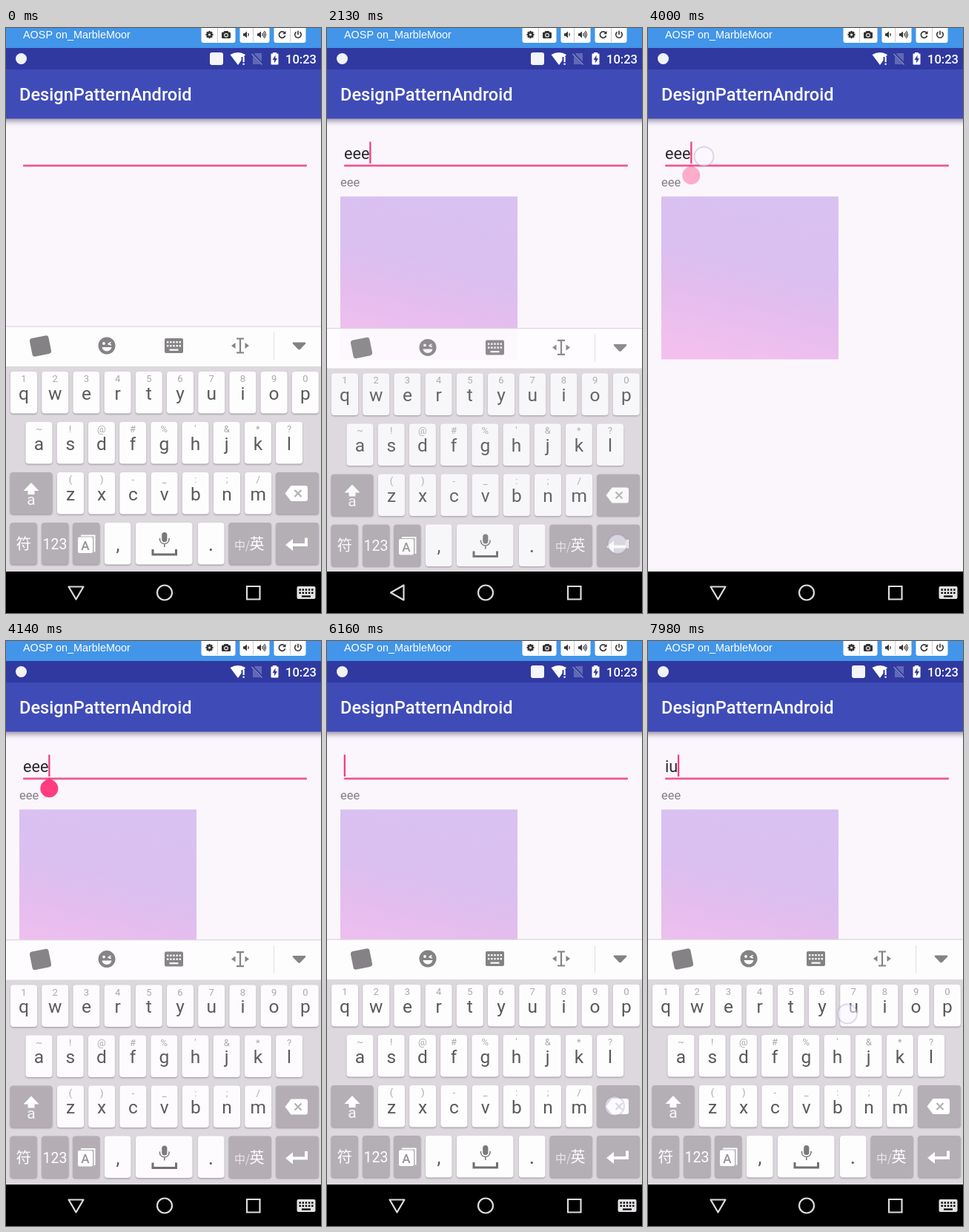
An HTML page with a canvas for the animation above (8000 ms loop, 425 px wide and 790 px high).

```html
<!DOCTYPE html>
<html lang="en">
<head>
<meta charset="utf-8">
<title>Text field demo</title>
<style>
  html, body { margin: 0; width: 100%; height: 100%; overflow: hidden; background: #fbf6fc; }
  canvas { display: block; width: 425px; height: 790px; }
</style>
</head>
<body>
<canvas id="stage"></canvas>
<script>
const W = 425, H = 790, LOOP = 8000;
const canvas = document.getElementById('stage');
const ratio = window.devicePixelRatio || 1;
canvas.width = W * ratio;
canvas.height = H * ratio;
const c = canvas.getContext('2d');

const ROBOTO = 'Roboto, sans-serif';
const ARIAL = '"Liberation Sans", Arial, sans-serif';
const CJK = '"Noto Sans CJK SC", "Noto Sans CJK", sans-serif';
const PINK = '#ff3d7f', PAPER = '#fbf6fc', KEY_GRAY = '#b4afb4', ICON = '#858285';
const PITCH = 42.2, KEY_W = 36, KEY_H = 56.5;

// Touches: start, end, position and the key they press.
const taps = [
  [420, 590, 105, 505, 'e'], [660, 840, 105, 505, 'e'], [900, 1210, 105, 505, 'e'],
  [1980, 2140, 392, 697, 'enter'], [3830, 4080, 75.5, 173.5, ''],
  [5750, 5870, 388, 628, 'del'], [5930, 6040, 388, 628, 'del'],
  [6080, 6230, 388, 628, 'del'], [6300, 6430, 388, 628, 'del'],
  [7220, 7500, 320, 504, 'i'], [7800, 8000, 269, 503.5, 'u']
].map(([start, end, x, y, key]) => ({ start, end, x, y, key }));

const edits = [[0, ''], [510, 'e'], [760, 'ee'], [1010, 'eee'],
  [5800, 'ee'], [5960, 'e'], [6110, ''], [7330, 'i'], [7920, 'iu']];
const blinks = [480, 1500, 1980, 2520, 3000, 3470, 3900, 4460, 4950, 5410, 5800, 6610, 7060];

const clamp = v => Math.max(0, Math.min(1, v));
const between = (t, a, b) => t >= a && t < b;

function rect(x, y, w, h, fill, r = 0) {
  c.fillStyle = fill;
  c.beginPath();
  c.roundRect(x, y, w, h, r);
  c.fill();
}
function disc(x, y, r, fill) {
  c.fillStyle = fill;
  c.beginPath();
  c.arc(x, y, r, 0, 7);
  c.fill();
}
function path(d, fill, stroke, width = 2) {
  const p = new Path2D(d);
  if (fill) { c.fillStyle = fill; c.fill(p); }
  if (stroke) { c.strokeStyle = stroke; c.lineWidth = width; c.stroke(p); }
}
function text(s, x, y, font, color, align = 'left') {
  c.font = font;
  c.fillStyle = color;
  c.textAlign = align;
  c.fillText(s, x, y);
}
function at(x, y, draw) {
  c.save();
  c.translate(x, y);
  draw();
  c.restore();
}
function withShadow(color, blur, dy, draw) {
  c.save();
  c.shadowColor = color;
  c.shadowBlur = blur * ratio;
  c.shadowOffsetY = dy * ratio;
  draw();
  c.restore();
}

function toolbarButtons() {
  const dark = '#333';
  rect(0, 0, W, 27, '#4295e9');
  text('AOSP on_MarbleMoor', 23, 14, '14.4px ' + ARIAL, '#fff');
  for (const [x, w, split] of [[263.5, 46, 285.5], [315.5, 40, 333.5], [361.5, 43, 383.5]]) {
    rect(x, -5, w, 25, '#fff', 3);
    path(`M${split} 0V19`, null, '#c8ccd2', 1);
  }
  at(274.5, 9, () => {
    for (let i = 0; i < 8; i++) {
      rect(-1.2, -5, 2.4, 3, dark);
      c.rotate(Math.PI / 4);
    }
    disc(0, 0, 3.7, dark);
    disc(0, 0, 1.6, '#fff');
  });
  at(297, 9, () => {
    rect(-6, -3.5, 12, 8.5, dark, 1.5);
    rect(-3, -5, 6, 3, dark, 1);
    disc(0, 0.7, 2.8, '#fff');
    disc(0, 0.7, 1.8, dark);
  });
  const speaker = 'M-4 -1.7H-2L1 -4.5V4.5L-2 1.7H-4Z';
  at(324, 9, () => {
    path(speaker, dark);
    path('M2.5 -1.8Q4.2 0 2.5 1.8', null, dark, 1.1);
  });
  at(343, 9, () => {
    path(speaker, dark);
    path('M2.5 -1.8Q4.2 0 2.5 1.8M4 -3.4Q7 0 4 3.4M5.5 -4.8Q9.5 0 5.5 4.8', null, dark, 1.1);
  });
  at(372.5, 9, () => {
    path('M3.3 -2.6A4.2 4.2 0 1 0 4.1 1.2', null, dark, 1.7);
    path('M5 -5V-0.7H0.7Z', dark);
  });
  at(394, 9, () => path('M-2.4 -3.6A4.3 4.3 0 1 0 2.4 -3.6M0 -5.3V0', null, dark, 1.6));
}

function statusBar(imeIcon) {
  rect(0, 27, W, 29, '#3039a0');
  disc(20.5, 41.5, 7.5, '#f2f2fa');
  if (imeIcon) rect(275, 33, 18, 17, '#f4f4fb', 3);
  path('M302.5 36Q313 30 323 36L313 50Z', '#fff');
  rect(317.5, 39, 6, 12, '#3039a0');
  rect(319.5, 39, 2.2, 7, '#fff');
  rect(319.5, 47.6, 2.2, 2.2, '#fff');
  path('M336 34H345V49H333V37Z', '#6169b3');
  path('M331.5 34L346 49', null, '#3039a0', 3.4);
  path('M331.5 35L345.5 49.5', null, '#8990c8', 1.3);
  rect(360, 33, 5, 3, '#fff');
  rect(357.5, 34.5, 10, 15, '#fff', 1);
  path('M363.5 36.5L359.5 43H362V47.5L366 41H363.5Z', '#3039a0');
  text('10:23', 377, 48, '500 16.5px ' + ROBOTO, '#fff');
}

function appBar() {
  withShadow('rgba(60,50,80,.5)', 7, 3, () => rect(-10, 56, W + 20, 66.5, '#3f4cb8'));
  text('DesignPatternAndroid', 18, 98, '500 23.6px ' + ROBOTO, '#fff');
}

function content(t) {
  const typed = edits.filter(e => t >= e[0]).pop()[1];
  rect(23, 184.6, 383, 2.7, '#ee578f', 1);
  text(typed, 23, 177, '21.7px ' + ROBOTO, '#2b282c');
  const caret = 23.8 + c.measureText(typed).width;
  if (blinks.filter(b => t >= b).length % 2) rect(caret - 1.1, 153.5, 2.3, 29.5, '#f0407f');

  if (t >= 2080) {
    text('eee', 18, 214, '16.5px ' + ROBOTO, '#837f84');
    const g = c.createLinearGradient(165, 228, 112, 452);
    g.addColorStop(0, '#d9c1f2');
    g.addColorStop(.38, '#d9c0f1');
    g.addColorStop(.65, '#e4bdee');
    g.addColorStop(1, '#f3c0ee');
    rect(18, 227.5, 239, 220, g, 1);
  }
  if (between(t, 3960, 5780)) {
    c.globalAlpha = t < 4080 ? .4 : 1;
    path('M58.3 184L66.8 190.8A12 12 0 1 1 49.8 190.8Z', PINK);
    c.globalAlpha = 1;
  }
}

function key(x, y, w, fill = '#fefdfe') {
  withShadow('rgba(90,80,95,.45)', 2, 1.2, () => rect(x, y, w, KEY_H, fill, 4));
}
function keyRow(x, y, letters, hints) {
  [...letters].forEach((letter, i) => {
    const left = x + i * PITCH, mid = left + KEY_W / 2;
    key(left, y, KEY_W);
    text(hints[i], mid, y + 14, '13px ' + ROBOTO, '#aaa7ab', 'center');
    text(letter, mid, y + 37.8, '24.5px ' + ROBOTO, '#5b585c', 'center');
  });
}
function preview(letter) {
  const x = 6 + 'qwertyuiop'.indexOf(letter) * PITCH;
  withShadow('rgba(80,70,85,.5)', 4, 1, () =>
    path(`M${x - 8} 396H${x + 44}Q${x + 48} 396 ${x + 48} 400V446Q${x + 48} 454 ${x + 36} 464V516Q${x + 36} 520 ${x + 32} 520H${x + 4}Q${x} 520 ${x} 516V464Q${x - 12} 454 ${x - 12} 446V400Q${x - 12} 396 ${x - 8} 396Z`, '#fefdfe'));
  text(letter, x + 18, 440, '38px ' + ROBOTO, '#5b585c', 'center');
}

function keyboardGlyph(x, y, w, h, fill, dot) {
  rect(x - w / 2, y - h / 2, w, h, fill, 2);
  const step = w / 6;
  for (let r = 0; r < 2; r++)
    for (let i = -2; i <= 2; i++)
      rect(x + i * step - 1.2, y - h * .3 + r * h * .25, 2.4, 2.4, dot);
  rect(x - w * .24, y + h * .23, w * .48, 2.2, dot);
}

function suggestionBar() {
  rect(0, 403, W, 54, '#fefdfe');
  rect(0, 402.5, W, 1.2, '#d9d6da');
  at(46.5, 429.5, () => {
    c.rotate(-.2);
    rect(-13, -12.5, 26, 25, ICON, 4);
  });
  disc(136, 429, 11.5, ICON);
  disc(132, 426, 1.9, '#fefdfe');
  path('M137.5 427L141.5 424.5M138 427L142 428', null, '#fefdfe', 1.5);
  path('M129.5 431H142.5A6.6 6.6 0 0 1 129.5 431Z', '#fefdfe');
  keyboardGlyph(226.5, 429, 25, 20, ICON, '#fefdfe');
  path('M311 419.5H321M311 438.5H321M316 419.5V438.5', null, ICON, 2.2);
  path('M309.5 425V433L304 429ZM322.5 425V433L328 429Z', ICON);
  rect(361, 411, 1, 37, '#dedbdf');
  path('M387.5 424.5H403.5Q405 425 404 426.5L397 433.8Q395.5 435 394 433.8L387 426.5Q386 425 387.5 424.5Z', ICON);
}

function keyboard(pressed) {
  rect(0, 456, W, 280, '#dcd8dd');
  suggestionBar();
  keyRow(6, 464, 'qwertyuiop', '1234567890');
  keyRow(26.5, 532, 'asdfghjkl', "~!@#%'&*?");
  keyRow(69, 600, 'zxcvbnm', '()-_:;/');

  const gray = name => pressed === name ? '#9d979e' : KEY_GRAY;
  key(5.5, 600, 57, KEY_GRAY);
  path('M34 614L44.5 625H38.5V630H29.5V625H23.5Z', '#fff');
  text('a', 34, 644, '21px ' + ROBOTO, '#f8f6f8', 'center');
  key(364, 600, 58, gray('del'));
  path('M376.5 628.5L384.5 618H404Q407 618 407 621V636Q407 639 404 639H384.5Z', '#fff');
  path('M389.5 624L398.5 633M398.5 624L389.5 633', null, KEY_GRAY, 2.2);

  key(5.5, 668, 36.5, KEY_GRAY);
  text('符', 23.8, 704, '20.5px ' + CJK, '#fff', 'center');
  key(48, 668, 36.5, KEY_GRAY);
  text('123', 66, 704, '19.5px ' + ROBOTO, '#fff', 'center');
  key(90, 668, 36.5, KEY_GRAY);
  path('M101 685.5H119.5V707.5', null, '#fff', 2);
  rect(97, 687.5, 20, 21.5, '#fff', 2);
  text('A', 107, 704.5, '500 17px ' + ROBOTO, '#969197', 'center');
  key(133, 668, 35.5);
  text(',', 151, 706, '25px ' + ROBOTO, '#5b585c', 'center');
  key(175, 668, 76.5);
  rect(210.2, 681, 7.2, 13, '#7c797d', 3.6);
  path('M207.5 689V691A6.3 6.3 0 0 0 220 691V689M213.8 697V701', null, '#7c797d', 1.6);
  path('M198 704V711H229.5V704', null, '#716e72', 3);
  key(259, 668, 35.5);
  text('.', 276.5, 706, '28px ' + ROBOTO, '#5b585c', 'center');
  key(300.5, 668, 57.5, KEY_GRAY);
  text('中/', 308, 704, '15px ' + CJK, '#ece9ec');
  text('英', 328.5, 704, '20px ' + CJK, '#fff');
  key(364, 668, 58, gray('enter'));
  path('M405 688.5V698H385', null, '#fff', 4);
  path('M377 698L387 690V706Z', '#fff');
}

function navBar(imeOpen) {
  const tint = '#dddbdd';
  rect(0, 734, W, 56, '#000');
  c.lineJoin = 'round';
  path(imeOpen ? 'M84.5 754.5H104.5L94.5 771.5Z' : 'M103.5 752.5V772.5L86 762.5Z', null, tint, 2.2);
  c.lineJoin = 'miter';
  path('M224 762.5A10 10 0 1 1 204 762.5A10 10 0 1 1 224 762.5Z', null, tint, 2.2);
  path('M325 754H342.5V771.5H325Z', null, tint, 2.2);
  if (imeOpen) keyboardGlyph(405, 762.5, 25, 17, '#e4e2e4', '#000');
}

function touch(tap) {
  disc(tap.x, tap.y, 13, 'rgba(250,247,255,.55)');
  c.strokeStyle = 'rgba(150,140,185,.3)';
  c.lineWidth = 2;
  c.beginPath();
  c.arc(tap.x, tap.y, 13, 0, 7);
  c.stroke();
}

// How far the keyboard is shown, 0 to 1.
function imeProgress(t) {
  if (t < 3000) return 1 - clamp((t - 2090) / 150) ** 2;
  return 1 - (1 - clamp((t - 4025) / 155)) ** 3;
}

function render(t) {
  c.setTransform(ratio, 0, 0, ratio, 0, 0);
  rect(0, 0, W, H, PAPER);
  appBar();
  content(t);
  statusBar(!between(t, 2140, 4230));
  toolbarButtons();

  const tap = taps.find(p => between(t, p.start, p.end));
  const age = tap ? t - tap.start : 0;
  const shown = imeProgress(t);
  if (shown > 0) {
    c.save();
    c.globalAlpha = shown;
    c.translate(0, 33 * (1 - shown));
    keyboard(tap && age < 70 ? tap.key : '');
    c.restore();
  }
  if (tap && tap.key.length === 1 && age < 120) preview(tap.key);
  navBar(!between(t, 2100, 3960));
  if (tap) touch(tap);
}

const begin = performance.now();
function tick() {
  render((performance.now() - begin) % LOOP);
  requestAnimationFrame(tick);
}
tick();
</script>
</body>
</html>
```
